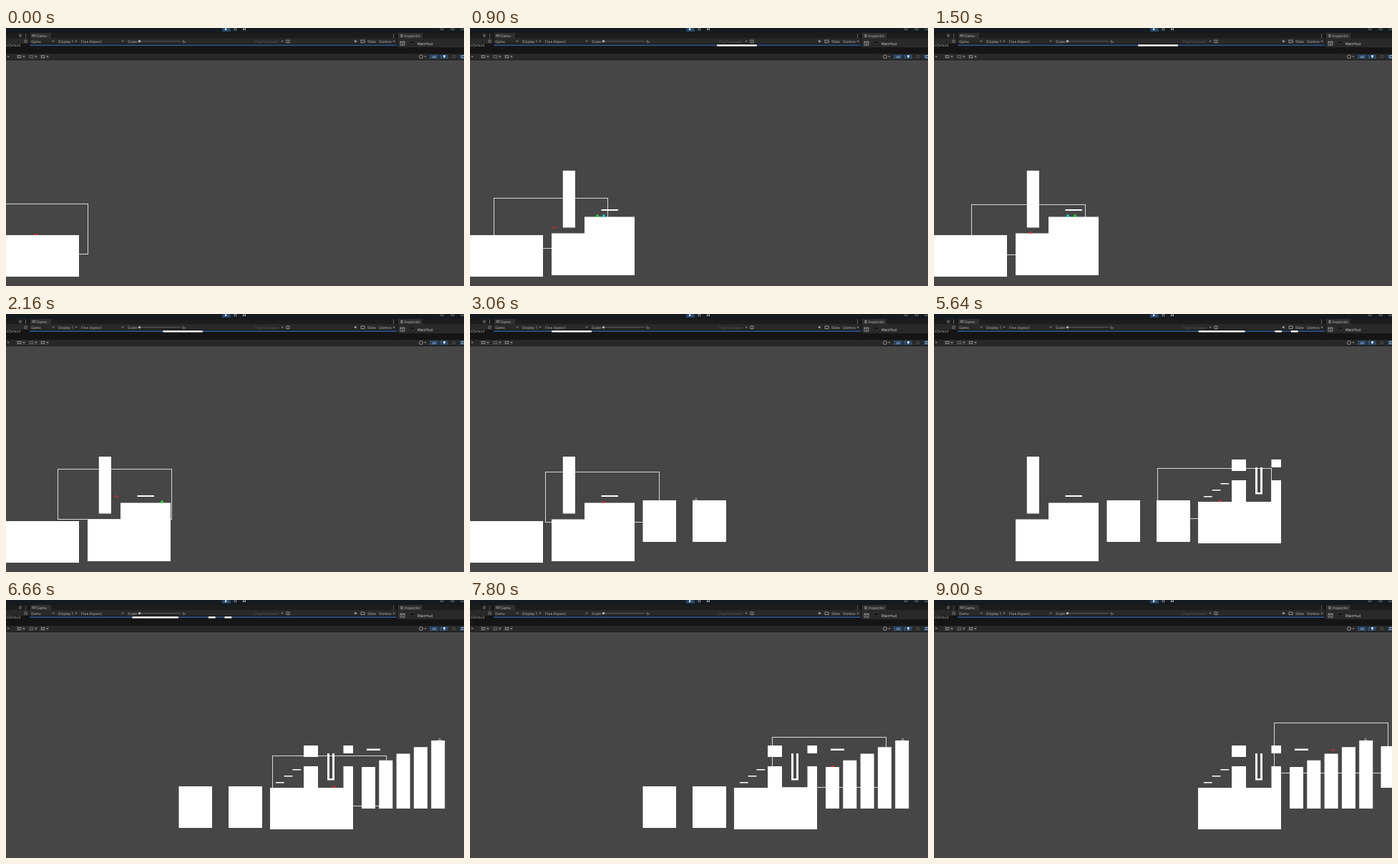
An HTML page with a canvas for the animation above (9.03 s loop, 640x360 px).

```html
<!DOCTYPE html>
<html lang="en">
<head>
<meta charset="utf-8">
<style>
html, body { margin: 0; width: 100%; height: 100%; overflow: hidden; background: #464646; }
canvas { display: block; width: 640px; height: 360px; }
</style>
</head>
<body>
<canvas id="stage" width="640" height="360"></canvas>
<script>
const ctx = document.getElementById('stage').getContext('2d');
const LOOP = 9030, VIEW_W = 159, VIEW_H = 70;
const range = (n, make) => Array.from({ length: n }, (_, i) => make(i));

// Boxes are [x, y, width, height]; only solid ones carry the player
const chunks = [
  { start: -99, solid: [[-20, 289, 122, 58]], floating: [] },
  { start: 114.5,
    solid: [[114, 286.5, 116, 58.5], [160, 263.5, 70, 30]],
    floating: [[129.8, 199, 17.2, 79.5], [183.5, 253, 23.5, 2]] },
  { start: 241, solid: [[241.5, 260, 46.5, 58], [311, 260, 47, 58]], floating: [] },
  { start: 369,
    solid: [[369, 262, 116, 58], [416, 232, 20, 31], [471.5, 232, 13.5, 31]],
    floating: [[416, 203, 20, 16], [471.5, 203, 13.5, 11],
      [449, 214, 3, 37], [456, 214, 3, 37], [449, 249, 10, 2.5],
      ...range(3, i => [377 + i * 11.7, 254 - i * 9, 11.7, 1.5])] },
  { start: 497,
    solid: range(5, i => [497 + i * 24.3, 233 - i * 9.25, 19, 58 + i * 9.25]),
    floating: [[504, 207.5, 19, 2.5]] },
  { start: 624, solid: [[624.5, 204, 60, 58]], floating: [] }
];
const solids = chunks.flatMap(c => c.solid);

// Pace of the run: [time, player x, camera offset x, camera offset y]
const run = [
  [0, 42, 87, 43], [900, 118, 85, 41], [2160, 155, 83, 38], [3060, 187, 82.5, 42.5],
  [4440, 330, 89, 49], [6660, 459, 87.5, 44], [9000, 558, 83, 38.4]
];

// Lives until `to`, walks from x0 to x1 between the two times
const enemies = [
  { home: 1, color: '#19e32d', y: 262, from: 459, to: 2380, x0: 164, x1: 225 },
  { home: 1, color: '#19d8e3', y: 262, from: 0, to: 1600, x0: 187, x1: 187 },
  { home: 2, color: '#858585', y: 258.5, from: 0, to: 3900, x0: 316, x1: 316 },
  { home: 3, color: '#0808f0', y: 231, from: 0, to: 5600, x0: 418, x1: 418 },
  { home: 4, color: '#858585', y: 194.5, from: 5800, to: LOOP, x0: 607, x1: 603 }
];

const lerp = (a, b, k) => a + (b - a) * k;
const clamp = k => Math.max(0, Math.min(1, k));

function pace(t) {
  const i = Math.max(1, run.findIndex(p => p[0] >= t));
  const b = t > run.at(-1)[0] ? run.at(-1) : run[i];
  const a = run[run.indexOf(b) - 1];
  const k = clamp((t - a[0]) / (b[0] - a[0]));
  return a.map((v, n) => lerp(v, b[n], k));
}

// Highest solid top at x; gaps keep the height of the ledge before them
function ground(x) {
  const tops = solids.filter(b => x >= b[0] && x < b[0] + b[2]).map(b => b[1]);
  return tops.length ? Math.min(...tops) : ground(x - 2);
}

// The player walks on the ground and hops before every left wall
function playerY(x) {
  let y = ground(x);
  for (const [wall] of solids) {
    const d = (x - wall + 3.5) / 9;
    if (Math.abs(d) < 1) y = Math.min(y, ground(wall - 12) - 32 * (1 - d * d));
  }
  return y - 1;
}

function box(color, x, y, w, h) {
  ctx.fillStyle = color;
  ctx.fillRect(x, y, w, h);
}

function text(str, x, y, color = '#aaa', size = 5) {
  ctx.fillStyle = color;
  ctx.font = size + 'px Inter, sans-serif';
  ctx.fillText(str, x, y);
}

function triangle(color, ...points) {
  ctx.fillStyle = color;
  ctx.beginPath();
  for (let i = 0; i < 6; i += 2) ctx.lineTo(points[i], points[i + 1]);
  ctx.fill();
}

const arrow = (x, y) => triangle('#999', x - 1.5, y - 1, x + 1.5, y - 1, x, y + 1);

function icon(x, y, color = '#999', w = 4, h = 3) {
  ctx.strokeStyle = color;
  ctx.lineWidth = 0.8;
  ctx.strokeRect(x, y, w, h);
}

function circle(x, y, r) {
  ctx.beginPath();
  ctx.arc(x, y, r, 0, 7);
}

function drawWorld(visible) {
  for (const c of visible) for (const b of [...c.solid, ...c.floating]) box('#fff', ...b);
}

function drawPlayBar() {
  box('#141a20', 0, 0, 640, 7);
  box('#24486d', 302, 0, 12, 5);
  triangle('#eee', 306, 0, 309.5, 1.7, 306, 3.5);
  triangle('#aaa', 331, 0, 334, 1.7, 331, 3.5);
  for (const x of [318.5, 321, 334]) box('#aaa', x, 0, 1, 3.5);
  for (const x of [607, 622, 636]) icon(x, 0, '#777', 4, 2.5);
}

function drawTabs() {
  box('#1c1c1c', 0, 7, 640, 7);
  box('#303030', 34, 7, 29, 7);
  box('#303030', 548, 7, 34, 7);
  text('Game', 43, 13);
  icon(37, 9.5, '#999', 4, 2);
  text('Inspector', 557, 13);
  icon(552, 9.5, '#aaa', 2, 3);
  icon(19, 9, '#888', 2, 3);
  for (const x of [27, 541]) for (const y of [8.5, 10.5, 12.5]) box('#999', x, y, 1, 1);
}

function drawGameBar() {
  box('#292929', 0, 14, 640, 9);
  box('#151515', 0, 22, 640, 14);
  icon(26, 17, '#888', 3, 3);
  const labels = { Game: 35, 'Display 1': 73, 'Free Aspect': 105, Scale: 170, '1x': 246, Stats: 505, Gizmos: 521 };
  for (const [label, x] of Object.entries(labels)) text(label, x, 20.5);
  text('Play Focused', 348, 20.5, '#555');
  for (const x of [66, 98, 163, 386, 542]) arrow(x, 18.7);
  box('#656565', 184, 18.2, 60, 0.8);
  ctx.fillStyle = '#aaa';
  circle(186.5, 18.6, 1.8);
  ctx.fill();
  icon(392, 17, '#aaa', 4, 3.5);
  triangle('#aaa', 486, 18.5, 489.5, 16.5, 489.5, 20.5);
  icon(496, 17, '#aaa', 5, 3.5);
  text('ectDefault', -4, 26.2, '#999');
}

function drawInspector() {
  box('#292929', 547, 14, 93, 13);
  icon(551, 19, '#aaa', 6, 5);
  ctx.beginPath();
  ctx.moveTo(551, 19);
  ctx.lineTo(554, 21.5);
  ctx.lineTo(557, 19);
  ctx.moveTo(554, 21.5);
  ctx.lineTo(554, 24);
  ctx.stroke();
  box('#151515', 566, 19, 5, 5);
  text('✓', 566.5, 23.5, '#bbb');
  text('MainHud', 575, 23.7, '#ccc');
}

function drawSceneBar() {
  box('#282828', 0, 36, 640, 8);
  box('#1d1d1d', 0, 44, 640, 1);
  for (const x of [14, 31, 47]) {
    box('#363636', x, 37, 13, 6);
    icon(x + 2.5, 38.5, x === 31 ? '#666' : '#999');
    arrow(x + 11, 40);
  }
  arrow(3, 40);
  arrow(586, 40);
  ctx.strokeStyle = '#aaa';
  circle(580, 40, 2.5);
  ctx.stroke();
  for (const x of [592, 606, 634]) box('#29496b', x, 37, 12, 6);
  text('2D', 595.5, 41.5, '#ddd', 4);
  box('#ddd', 611, 38, 3, 2.5);
  box('#ddd', 612, 40, 1, 2);
  icon(624, 38.5, '#555');
  icon(637, 38.5, '#bbb');
}

// A thin slice of the running game shows above the scene
function drawGameView(visible, left, top) {
  const scale = 513 / VIEW_W;
  ctx.save();
  ctx.beginPath();
  ctx.rect(33, 23, 513, 2.6);
  ctx.clip();
  box('#2b4c78', 33, 23, 513, 2);
  ctx.translate(33, 23);
  ctx.scale(scale, scale);
  ctx.translate(-left, -top);
  drawWorld(visible);
  ctx.restore();
}

function draw(now) {
  const t = now % LOOP;
  const [, px, dx, dy] = pace(t);
  const py = playerY(px);
  const left = px - dx, top = py - dy;
  // Only the three most recently reached chunks stay loaded
  const visible = chunks.filter(c => c.start <= left + VIEW_W).slice(-3);

  box('#464646', 0, 0, 640, 360);
  ctx.strokeStyle = '#d8d8d8';
  ctx.lineWidth = 1;
  ctx.strokeRect(Math.round(left) + 0.5, Math.round(top) + 0.5, VIEW_W, VIEW_H);
  drawWorld(visible);

  for (const e of enemies) {
    if (t > e.to || !visible.includes(chunks[e.home])) continue;
    const x = lerp(e.x0, e.x1, clamp((t - e.from) / (e.to - e.from)));
    triangle(e.color, x - 2.8, e.y + 1.5, x, e.y - 2.5, x + 2.8, e.y + 1.5);
  }
  box('#e8202a', px - 2.5, py - 1, 4, 2);

  drawPlayBar();
  drawTabs();
  drawGameBar();
  drawInspector();
  drawSceneBar();
  box('#111', 32, 7, 1, 20);
  box('#111', 546, 7, 1, 29);
  drawGameView(visible, left, top);
  requestAnimationFrame(draw);
}
requestAnimationFrame(draw);
</script>
</body>
</html>
```
